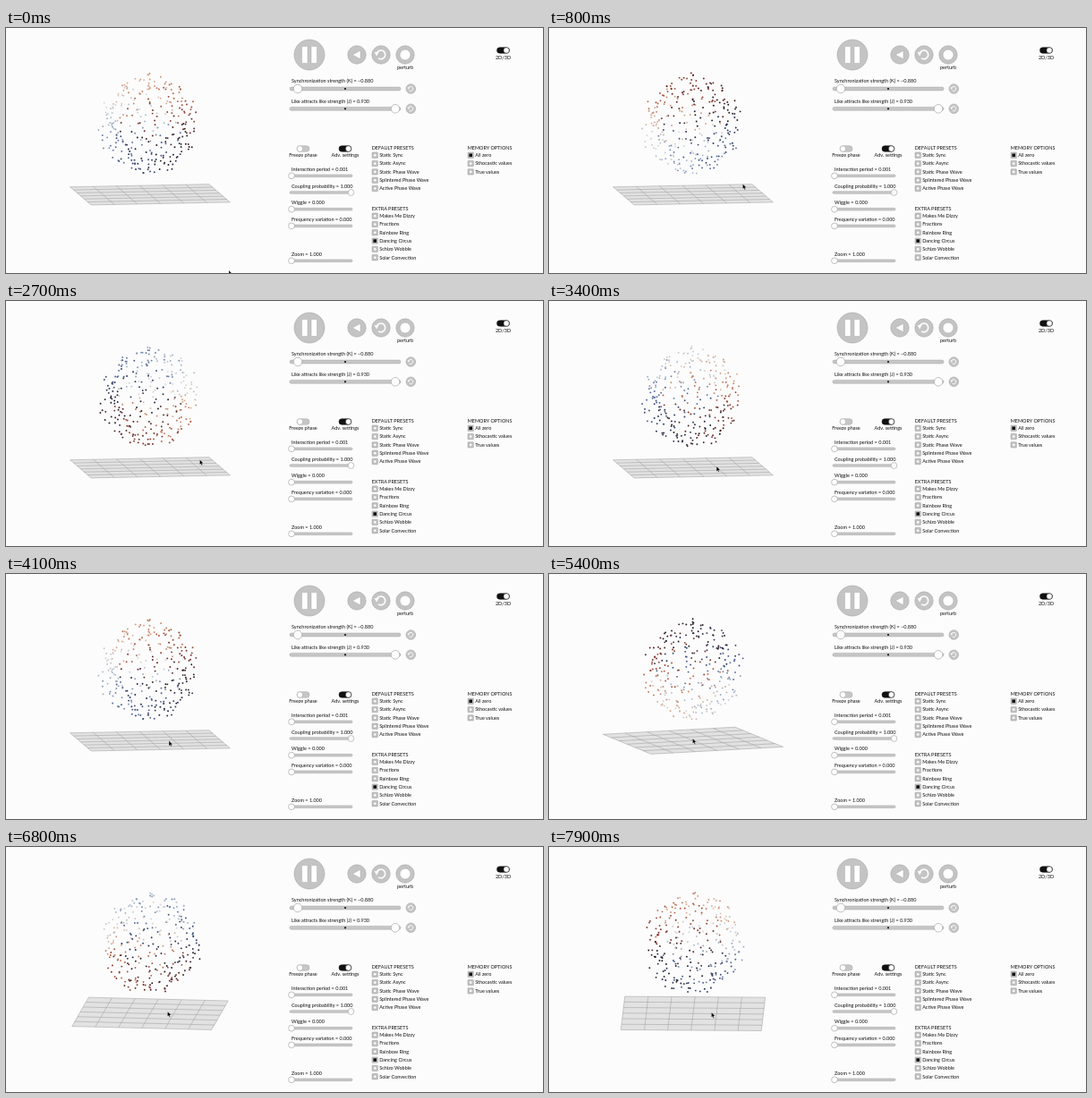
Write an HTML page that moves like this. It is 600 px wide and 274 px high and loops after 8 s.

```html
<!DOCTYPE html>
<html lang="en">
<head>
<meta charset="utf-8">
<title>Swarm simulation</title>
<style>
  html, body { margin: 0; width: 100%; height: 100%; overflow: hidden; background: #fcfcfc; }
  svg { display: block; width: 600px; height: 274px; }
  text { font: 5.5px Lato, "Open Sans", sans-serif; fill: #111; }
</style>
</head>
<body>
<svg id="stage" viewBox="0 0 600 274"></svg>
<script>
const LOOP = 8000, STEP = 100;
const stage = document.getElementById('stage');
const RAD = Math.PI / 180;

function add(tag, attrs, content) {
  const node = document.createElementNS('http://www.w3.org/2000/svg', tag);
  for (const key in attrs) node.setAttribute(key, attrs[key]);
  if (content) node.textContent = content;
  stage.appendChild(node);
  return node;
}
const label = (x, y, content, anchor = 'start') => add('text', { x, y, 'text-anchor': anchor }, content);
const circle = (cx, cy, r, fill, stroke = 'none', width = 0.6) =>
  add('circle', { cx, cy, r, fill, stroke, 'stroke-width': width });
const rect = (x, y, width, height, fill, rx = 0, stroke = 'none') =>
  add('rect', { x, y, width, height, fill, rx, stroke, 'stroke-width': 0.5 });
const path = (d, fill, stroke = 'none', width = 0.5) =>
  add('path', { d, fill, stroke, 'stroke-width': width });

// Control panel

function slider(x1, x2, y, knob, r, content) {
  const h = r * 0.8;
  label(319, y - r - 2, content);
  rect(x1, y - h / 2, x2 - x1, h, '#c6c6c6', h / 2, '#a4a4a4');
  if (r > 4) circle(379, y, 1.1, '#111');
  circle(knob, y, r, '#fff', '#999');
}

function toggle(x, y, on, content, dy) {
  rect(x - 7, y - 3.3, 14, 6.6, on ? '#111' : '#c6c6c6', 3.3, on ? '#111' : '#a4a4a4');
  circle(x + (on ? 3.6 : -3.6), y, 3.2, '#fff', on ? '#111' : '#999', 0.5);
  label(x, y + dy, content, 'middle');
}

function reload(x, y, r) {
  circle(x, y, r, '#c4c4c4', '#a4a4a4');
  const q = r * 0.48;
  path(`M${x - q} ${y - q * 0.3}A${q} ${q} 0 1 1 ${x - q * 0.6} ${y + q * 0.8}`, 'none', '#fff', r * 0.16);
  path(`M${x - q * 1.5} ${y - q * 0.6}h${q}l${-q * 0.5} ${q * 0.9}z`, '#fff');
}

function options(x, headY, firstY, title, items, chosen) {
  label(x - 0.3, headY, title);
  items.forEach((item, i) => {
    const y = firstY + i * 9.3;
    rect(x, y - 3.2, 6.4, 6.4, '#c0c0c0', 0.5, '#a0a0a0');
    if (i === chosen) rect(x + 1.4, y - 1.8, 3.6, 3.6, '#111');
    else circle(x + 3.2, y, 1.3, '#fff');
    label(x + 8.2, y + 1.8, item);
  });
}

function panel() {
  circle(339, 30, 17, '#c4c4c4', '#a4a4a4');
  for (const x of [330.5, 341]) rect(x, 20.5, 6.5, 19, '#fff', 0.5, '#aaa');
  circle(392, 30, 10.2, '#c4c4c4', '#a4a4a4');
  path('M387 30L396 25.2V34.8Z', '#fff', '#aaa');
  reload(419, 30, 10.2);
  circle(446, 30, 10.2, '#c4c4c4', '#a4a4a4');
  circle(446, 30, 6, '#fff', '#aaa');
  label(446, 46.3, 'perturb', 'middle');

  slider(317, 441, 68, 326, 4.8, 'Synchronization strength (K) = −0.880');
  slider(317, 441, 90.3, 435, 4.8, 'Like attracts like strength (J) = 0.930');
  reload(452.3, 68, 5.3);
  reload(452.3, 90.3, 5.3);

  toggle(555.5, 25, true, '2D/3D', 9.8);
  toggle(332, 135, false, 'Freeze phase', 9);
  toggle(379, 135, true, 'Adv. settings', 9);

  slider(317, 387, 165.3, 319, 3.4, 'Interaction period = 0.001');
  slider(317, 387, 184, 385.5, 3.4, 'Coupling probability = 1.000');
  slider(317, 387, 202.7, 319, 3.4, 'Wiggle = 0.000');
  slider(317, 387, 221.4, 319, 3.4, 'Frequency variation = 0.000');
  slider(317, 387, 260.3, 319, 3.4, 'Zoom = 1.000');

  options(409, 136, 142.3, 'DEFAULT PRESETS',
    ['Static Sync', 'Static Async', 'Static Phase Wave', 'Splintered Phase Wave', 'Active Phase Wave'], -1);
  options(409, 204, 210.2, 'EXTRA PRESETS',
    ['Makes Me Dizzy', 'Fractions', 'Rainbow Ring', 'Dancing Circus', 'Schizo Wobble', 'Solar Convection'], 3);
  options(516, 136, 142.3, 'MEMORY OPTIONS', ['All zero', 'Sthocastic values', 'True values'], 0);
}

// Scene

// Keys are [time, value, value, ...], joined by straight segments.
function track(keys, t) {
  let i = 1;
  while (i < keys.length - 1 && keys[i][0] < t) i++;
  const a = keys[i - 1], b = keys[i];
  const p = Math.min(1, Math.max(0, (t - a[0]) / (b[0] - a[0])));
  return a.slice(1).map((v, k) => v + (b[k + 1] - v) * p);
}

// Yaw in degrees and floor foreshortening.
const CAMERA = [[4500, 8.6, .13], [5400, 20, .15], [5900, 41, .195], [6350, 55, .2],
  [6800, 83.2, .208], [7200, 87, .22], [7900, 88.4, .238]];
const POINTER = [[0, 249, 271], [400, 226, 205], [800, 216.5, 174.5], [1900, 216.5, 175.5],
  [2700, 216.5, 177.5], [3500, 183, 186], [4500, 181.5, 187], [5400, 160.5, 184],
  [6200, 163, 184], [6800, 180.5, 184], [7900, 181.5, 185]];

const WHEEL = [[216, 214, 214], [212, 162, 134], [174, 84, 58], [104, 38, 36],
  [34, 26, 32], [40, 50, 88], [78, 100, 152], [160, 176, 194]];

function wheelColor(angle) {
  const turn = angle / (2 * Math.PI);
  const pos = (turn - Math.floor(turn)) * WHEEL.length;
  const i = Math.floor(pos) % WHEEL.length, next = WHEEL[(i + 1) % WHEEL.length];
  return `rgb(${WHEEL[i].map((v, k) => Math.round(v + (next[k] - v) * (pos % 1)))})`;
}

let seed = 20;
function random() {
  seed = (seed * 1664525 + 1013904223) % 4294967296;
  return seed / 4294967296;
}

const COUNT = 290, RADIUS = 57, CX = 161, CY = 108;
const FLOOR_Y = 186.3, HALF = 78.5, CELLS = 6;
const AXIS = 36 * RAD;

panel();
const floorFill = path('', '#e2e2e2', '#a8a8a8', 0.6);
const floorLines = path('', 'none', '#a0a0a0', 0.55);
const swarm = Array.from({ length: COUNT }, (_, i) => {
  const y = Math.max(-1, Math.min(1, 1 - 2 * (i + .5) / COUNT + (random() - .5) * .16));
  const turn = i * 2.39996 + (random() - .5) * .5;
  const size = Math.cbrt(.3 + random() * .7), ring = Math.sqrt(1 - y * y) * size;
  return {
    x: ring * Math.sin(turn), y: y * size, z: ring * Math.cos(turn),
    shift: random() * 6.283, noise: (random() - .5) * .7, node: circle(0, 0, .95, '#000')
  };
});
const pointer = path('M0 0V5.6L1.3 4.5L2.2 6.4L3.1 6L2.2 4.1H4Z', '#000', '#fff', 0.25);

function drawFloor(yaw, tilt) {
  const c = Math.cos(yaw), s = Math.sin(yaw);
  const at = (x, z) =>
    `${(CX + HALF * (x * c + z * s)).toFixed(2)} ${(FLOOR_Y + HALF * tilt * (z * c - x * s)).toFixed(2)}`;
  floorFill.setAttribute('d', `M${at(-1, -1)}L${at(1, -1)}L${at(1, 1)}L${at(-1, 1)}Z`);
  let d = '';
  for (let i = 1; i < CELLS; i++) {
    const p = -1 + 2 * i / CELLS;
    d += `M${at(p, -1)}L${at(p, 1)}M${at(-1, p)}L${at(1, p)}`;
  }
  floorLines.setAttribute('d', d);
}

function drawSwarm(yaw, t) {
  const c = Math.cos(yaw), s = Math.sin(yaw);
  const spin = 92 * RAD * t / 1000, light = 312 * RAD - spin;
  const centre = CX + 1.5 * (s - c);
  for (const p of swarm) {
    const x = p.x * c + p.z * s + .025 * Math.sin(spin + p.shift);
    const y = p.y + .025 * Math.cos(spin + p.shift);
    const side = p.x * Math.cos(AXIS) - p.z * Math.sin(AXIS);
    p.node.setAttribute('cx', (centre + RADIUS * x).toFixed(2));
    p.node.setAttribute('cy', (CY - RADIUS * y).toFixed(2));
    p.node.setAttribute('fill', wheelColor(Math.atan2(side, p.y) - light + p.noise));
  }
}

function render(now) {
  const t = Math.floor((now % LOOP) / STEP) * STEP;
  const [degrees, tilt] = track(CAMERA, t);
  const [px, py] = track(POINTER, t);
  drawFloor(degrees * RAD, tilt);
  drawSwarm(degrees * RAD, t);
  pointer.setAttribute('transform', `translate(${px.toFixed(2)} ${py.toFixed(2)})`);
}

let start = null;
function tick(now) {
  if (start === null) start = now;
  render(now - start);
  requestAnimationFrame(tick);
}
render(0);
requestAnimationFrame(tick);
</script>
</body>
</html>
```
